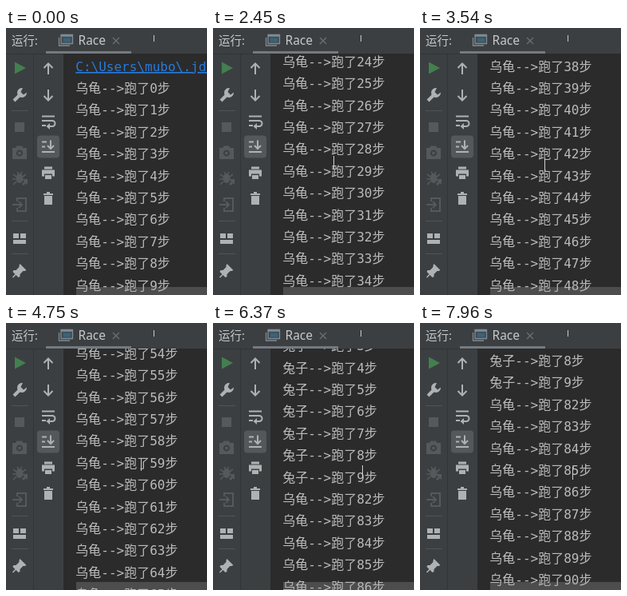
These frames come from a looping animation (252 px wide and 334 px high, 8000 ms). An HTML page:

```html
<!DOCTYPE html>
<html lang="zh">
<head>
<meta charset="utf-8">
<title>Race</title>
<style>
html, body { margin: 0; width: 100%; height: 100%; overflow: hidden; background: #3c3f41; }
svg { display: block; width: 252px; height: 334px; }
text { white-space: pre; }
.ui { font-family: "Noto Sans", "Noto Sans CJK SC", "Noto Sans CJK", sans-serif; font-weight: 500; fill: #c6c8ca; }
#rows { font: 16px "DejaVu Sans Mono", "Noto Sans CJK SC", "Noto Sans CJK", monospace; fill: #bbb; }
#rows .link { fill: #287bde; text-decoration: underline; }
.line { fill: none; stroke: #afb1b3; stroke-width: 2; }
.solid { fill: #afb1b3; }
.thin { stroke-width: 1.6; }
.dim .line { stroke: #56595b; }
.dim .solid { fill: #56595b; }
</style>
</head>
<body>
<svg viewBox="0 0 252 334">
  <defs><clipPath id="pane"><rect x="72" y="32" width="180" height="302"/></clipPath></defs>
  <rect width="252" height="334" fill="#3c3f41"/>
  <rect x="72" y="32" width="180" height="302" fill="#2b2b2b"/>
  <path d="M0 32.5H72M34.5 32V334" stroke="#323436"/>

  <text class="ui" x="7" y="21" font-size="14.5">运行:</text>
  <g>
    <rect x="50" y="29" width="107" height="3" fill="#747a80"/>
    <path d="M69 8.5H83.500V19.500H69Z" fill="#3f4c54" stroke="#7f8b93" stroke-width="1.3"/>
    <path d="M69 9.500H83.500" stroke="#7f8b93" stroke-width="2.6"/>
    <rect x="72" y="12.500" width="9" height="5" fill="#3b6478"/>
    <path d="M66.500 12V22H80" fill="none" stroke="#7f8b93" stroke-width="1.3"/>
    <text class="ui" x="90.500" y="21" font-size="15.5">Race</text>
    <path d="M134 12L142 20M142 12L134 20" stroke="#6e7173" stroke-width="1.2"/>
  </g>
  <path d="M185.500 9V17" stroke="#c8c8c8"/>

  <path d="M11 42.500L25 50L11 57.500Z" fill="#437f50"/>
  <path class="line" d="M10 91L18 83" style="stroke-width:4"/>
  <path class="solid" d="M21 75A6 6 0 1 0 26 80.500L22 83.500L18.500 80Z"/>
  <g class="dim">
    <rect class="solid" x="11" y="118" width="12" height="12"/>
    <path class="solid" fill-rule="evenodd" d="M8 150H12L13.500 147.500H20L21.500 150H26V164H8ZM17 152.500A4 4 0 1 0 17.010 152.500ZM17 154.500A2 2 0 1 1 16.990 154.500Z"/>
    <ellipse class="solid" cx="17" cy="188" rx="4.500" ry="6"/>
    <path class="line thin" d="M9 183L13 186M8 189H13M9 196L13 192M25 183L21 186M14 180L16 183M20 180L18 183"/>
    <path class="solid" d="M20 189H27V196L25 194L22 197L20 195L23 192Z"/>
    <path class="line" d="M14 217V213H25V229H14V225M8 221H19M16 217L20 221L16 225"/>
  </g>
  <path d="M7 103.500H28M7 241.500H28M7 282.500H28" stroke="#515456"/>
  <path class="solid" d="M9 257H16V263H9ZM18 257H25V263H18ZM9 265H25V270H9Z"/>
  <path class="solid" d="M17.500 295L25.500 303L23.500 304L21.500 304L17.500 308L17.500 311L15.500 312L8.500 305L9.500 303L12.500 303L16.500 299L16.500 297Z"/>
  <path class="line thin" d="M13.500 307L8.500 312"/>

  <rect x="39" y="134.500" width="28" height="28" rx="4" fill="#54585a"/>
  <path class="line" d="M53 58V45M47.500 50L53 44.500L58.500 50"/>
  <path class="line" d="M53 77V90M47.500 85L53 90.500L58.500 85"/>
  <path class="line" d="M45 110.500H61M45 116H58A3.500 3.500 0 0 1 58 123H54M45 122H50"/>
  <path class="solid" d="M55 119V127L50.500 123Z"/>
  <path class="line" d="M45 155H61M45 142.500H51M45 148.500H49M56 140.500V150.500M52 147L56 151L60 147"/>
  <path class="solid" d="M48 173.500H58V176.500H48ZM45 177.500H61V185.500H58V182.500H48V185.500H45ZM49 184H57V189H49Z"/>
  <path class="solid" d="M47 207H51V205H55V207H59V209H47ZM48 210H58V221H48Z"/>

  <g clip-path="url(#pane)">
    <g id="rows"></g>
    <rect x="88" y="324" width="164" height="10" fill="#a6a6a6" opacity=".28"/>
    <path id="beam" d="M0 -8V8" stroke="#d0d0d0"/>
  </g>
</svg>
<script>
const LOOP = 8000, STEP = 66, PITCH = 27.4, NOTCH = PITCH * 3;

// Wheel gestures: first redraw, duration, notch reached
const gestures = [
  [330, 1275, 6], [1780, 400, 8], [2450, 152, 9], [2600, 980, 13], [3810, 790, 18],
  [4680, 786, 24], [5570, 936, 29], [6570, 460, 30], [7230, 400, 31], [7760, 434, 30]
];

const rowBox = document.getElementById("rows");
const beam = document.getElementById("beam");
const rows = Array.from({ length: 13 }, () => {
  const row = document.createElementNS("http://www.w3.org/2000/svg", "text");
  row.setAttribute("x", 87.3);
  return rowBox.appendChild(row);
});

function smooth(p) {
  p = Math.min(1, Math.max(0, p));
  return p * p * (3 - 2 * p);
}

// The console redraws only every STEP ms while scrolling
function scrollAt(t) {
  let pos = 0;
  for (const [start, span, to] of gestures) {
    if (t < start) break;
    const count = Math.floor((t - start) / STEP + 0.1) + 1;
    pos += (to - pos) * smooth(count * STEP / span);
  }
  return pos * NOTCH;
}

// The tortoise rests after 82 steps while the hare takes its 10
function lineText(i) {
  if (i === 0) return "C:\\Users\\mubo\\.jdk";
  if (i <= 82) return `乌龟-->跑了${i - 1}步`;
  if (i <= 92) return `兔子-->跑了${i - 83}步`;
  return `乌龟-->跑了${i - 11}步`;
}

function draw(t) {
  const scroll = scrollAt(t);
  const first = Math.max(0, Math.floor(scroll / PITCH) - 1);
  rows.forEach((row, k) => {
    const i = first + k, text = lineText(i);
    if (row.textContent !== text) row.textContent = text;
    row.setAttribute("class", i ? "" : "link");
    row.setAttribute("y", Math.round(53.5 + i * PITCH - scroll));
  });
  const drift = smooth((t - 2450) / 4850);
  const x = Math.round(151 + 40 * drift) + 0.5, y = Math.round(168 + 20 * drift);
  beam.setAttribute("transform", `translate(${x} ${y})`);
  beam.setAttribute("visibility", t < 330 ? "hidden" : "visible");
}

const begin = performance.now();
function tick() {
  draw((performance.now() - begin) % LOOP);
  requestAnimationFrame(tick);
}
tick();
</script>
</body>
</html>
```
